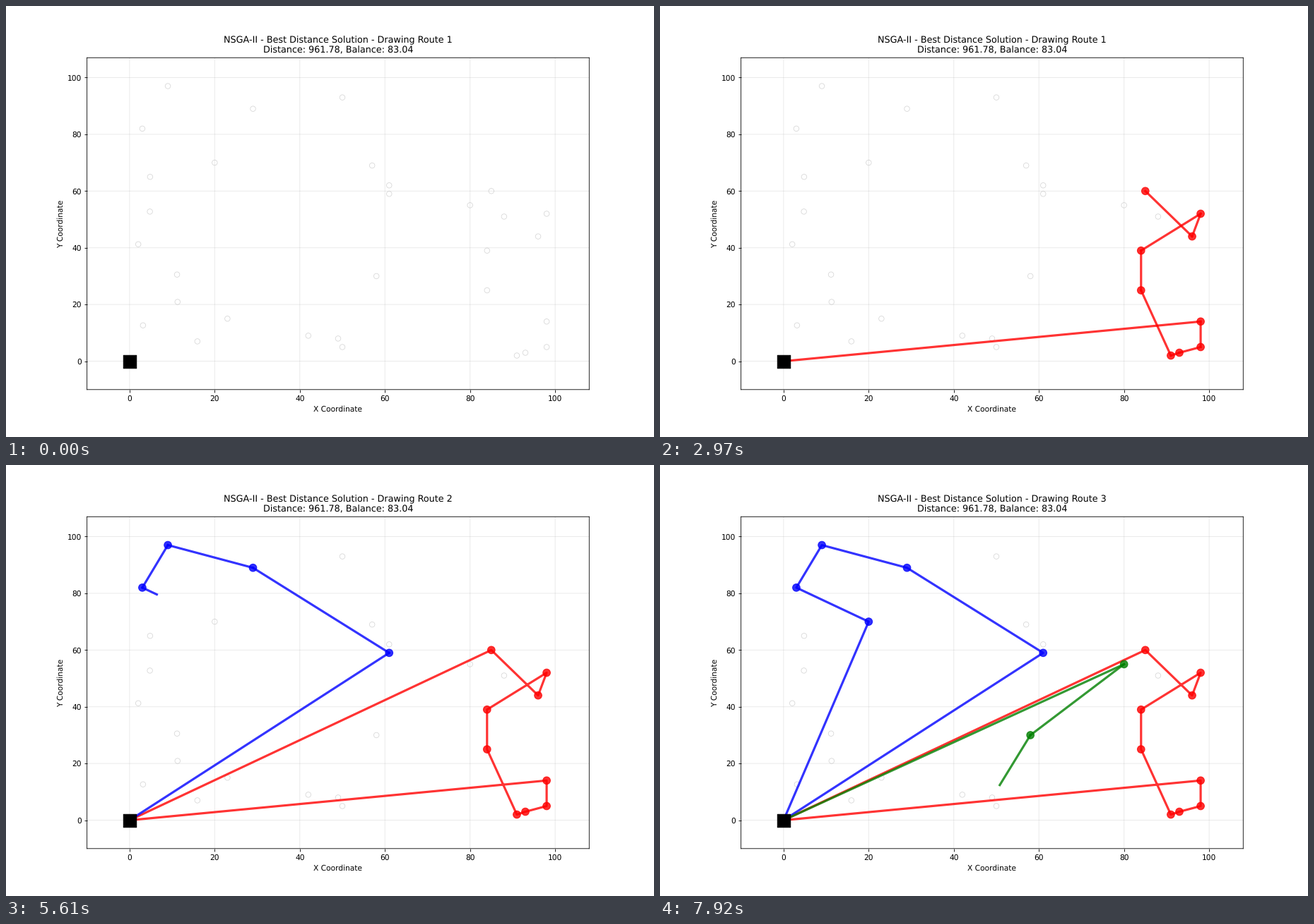
A matplotlib script for the animation above (8000 ms loop, 917 by 611 pixels).

```python
import matplotlib.pyplot as plt
import numpy as np
from matplotlib.animation import FuncAnimation

# Unsnapped lines and unhinted text give smooth sub-pixel placement
plt.rcParams.update({"path.snap": False, "text.hinting": "no_hinting"})

DPI = 76.4
W, H = 917, 611
LOOP, TICK, STEP = 8000, 40, 330   # ms
STEPS_PER_ROUTE = 10

DEPOT = (0, 0)
ROUTES = [
    ("red", [(98, 14), (98, 5), (93, 3), (91, 2), (84, 25),
             (84, 39), (98, 52), (96, 44), (85, 60)]),
    ("blue", [(61, 59), (29, 89), (9, 97), (3, 82), (20, 70)]),
    ("green", [(80, 55), (58, 30), (49, 8), (50, 5), (42, 9), (23, 15)]),
]


def waiting_customers():
    """Stops of later routes: a narrowing zigzag on the left, an arc on the right."""
    k = np.arange(7)
    x = (12 - 1.5 * k) * (1 + 0.7 * np.cos(2 * k - 5.2))
    y = 7 + 58 * (k / 6) ** 1.3
    arc = [(50, 93), (57, 69), (61, 62), (88, 51)]
    return [*zip(x, y), *arc]


def dots(points, size, **style):
    xs, ys = np.array(points).T
    return ax.scatter(xs, ys, s=np.full(len(xs), size), **style)


fig, ax = plt.subplots(figsize=((W + 1e-6) / DPI, (H + 1e-6) / DPI), dpi=DPI)
ax.set_xlim(-10, 108)
ax.set_ylim(-10, 107)
ax.set_autoscale_on(False)
ax.set_xlabel("X Coordinate")
ax.set_ylabel("Y Coordinate")
ax.grid(True, alpha=0.3)
customers = waiting_customers() + [p for _, stops in ROUTES for p in stops]
dots(customers, 50, c="white", edgecolors="gray", linewidths=0.8, alpha=0.3)
dots([DEPOT], 300, c="black", marker="s", zorder=10)

drawn = []


def draw_path(points, color):
    xs, ys = np.array(points).T
    drawn.extend(ax.plot(xs, ys, color=color, lw=3, alpha=0.8))


def draw_stops(points, color):
    if points:
        drawn.append(dots(points, 100, c=color, linewidths=1, alpha=0.8, zorder=3))


def draw_progress(points, color, step):
    """Draw the legs covered after `step` steps, the last one in part."""
    full, part = divmod(step * (len(points) - 1), STEPS_PER_ROUTE)
    for leg in zip(points[:full], points[1:]):
        draw_path(leg, color)
    if part:
        a, b = np.array(points[full:full + 2])
        draw_path([a, a + (b - a) * part / STEPS_PER_ROUTE], color)
    draw_stops(points[1:full + 1], color)


def update(i):
    while drawn:
        drawn.pop().remove()
    # 30 ms lead: a tick that contains a step change already shows it
    current, step = divmod((i * TICK + 30) // STEP, STEPS_PER_ROUTE)
    for n, (color, stops) in enumerate(ROUTES[:current + 1]):
        points = [DEPOT, *stops, DEPOT]
        if n < current:
            draw_path(points, color)
            draw_stops(stops, color)
        elif step:
            draw_progress(points, color, step)
    ax.set_title("NSGA-II - Best Distance Solution - "
                 f"Drawing Route {current + 1}\n"
                 "Distance: 961.78, Balance: 83.04")
    return drawn


anim = FuncAnimation(fig, update, frames=LOOP // TICK, interval=TICK,
                     repeat=True, repeat_delay=0, blit=False)
plt.show()
```
